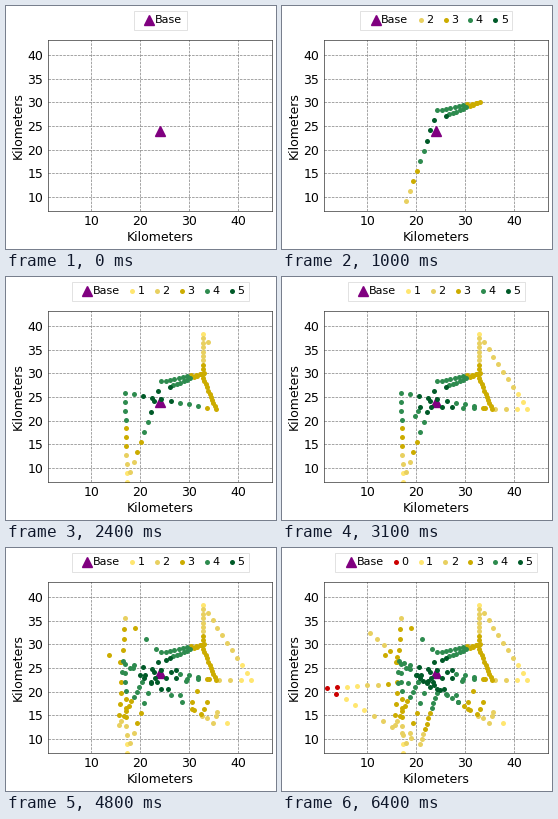
Write a matplotlib script that moves like this. It is 270x243 px and loops after 6500 ms.

```python
import numpy as np
import matplotlib.pyplot as plt
from matplotlib.animation import FuncAnimation

W, H, DPI = 270, 243, 100
FRAMES, INTERVAL = 65, 100
PER_FRAME = 3      # new samples per frame
STEPS = 10         # samples per leg of the route
RING = 4.05        # km from the base per level drop

BASE = np.array([24, 24])
# Turning points of the route, in km
ROUTE = np.array([
    (26, 27.2), (33.1, 30.1), (24.3, 28.3), (17.3, 7.1), (16.9, 25.9),
    (35.5, 22.4), (32.8, 29), (32.8, 38.3), (42.7, 22.4), (20.8, 23),
    (15.6, 12.9), (16.9, 35.6), (37.8, 13.5), (13.7, 27.8), (34.8, 13.5),
    (22.4, 22.2), (1.8, 20.8), (20.8, 9), (24.2, 19.7), (10.6, 32.4),
])
COLORS = ["#cc0000", "#ffe670", "#e8d060", "#ccac00", "#2e8b4f", "#005a28"]


def walk(route, steps):
    """Evenly spaced samples along each straight leg."""
    knots = np.arange(len(route)) * steps
    index = np.arange(knots[-1] + 1)
    return np.column_stack([np.interp(index, knots, axis) for axis in route.T])


points = walk(ROUTE, STEPS)
distance = np.hypot(*(points - BASE).T)
levels = np.maximum(5 - distance // RING, 0)

plt.rcParams.update({"font.family": "DejaVu Sans", "font.size": 9,
                     "axes.linewidth": 0.4, "axes.labelpad": 2})
fig = plt.figure(figsize=(W / DPI, H / DPI), dpi=DPI, facecolor="white")
ax = fig.add_axes([42.2 / W, 38.4 / H, 224 / W, 171 / H])
ax.set(xlim=(1.2, 46.95), ylim=(7.15, 43.25),
       xticks=range(10, 41, 10), yticks=range(10, 41, 5),
       xlabel="Kilometers", ylabel="Kilometers")
ax.tick_params(length=0)
ax.grid(color="gray", linestyle="--", linewidth=0.5)

base, = ax.plot(*BASE, "^", color="purple", ms=7, label="Base")
dots = [ax.plot([], [], "o", color=color, ms=3.6, mew=0, label=str(level))[0]
        for level, color in enumerate(COLORS)]


def draw(frame):
    count = frame * PER_FRAME
    seen, seen_levels = points[:count], levels[:count]
    handles = [base]
    for level, line in enumerate(dots):
        chosen = seen[seen_levels == level]
        line.set_data(chosen[:, 0], chosen[:, 1])
        if len(chosen):
            handles.append(line)
    legend = ax.legend(handles=handles, ncol=len(handles), fontsize=8,
                       loc="upper center", bbox_to_anchor=(0.5, 1.2),
                       handletextpad=-0.5, columnspacing=0.1, fancybox=False)
    legend.get_frame().set_linewidth(0.5)
    return handles


anim = FuncAnimation(fig, draw, frames=FRAMES, interval=INTERVAL,
                     init_func=lambda: draw(0), repeat=True, blit=False)
plt.show()
```
